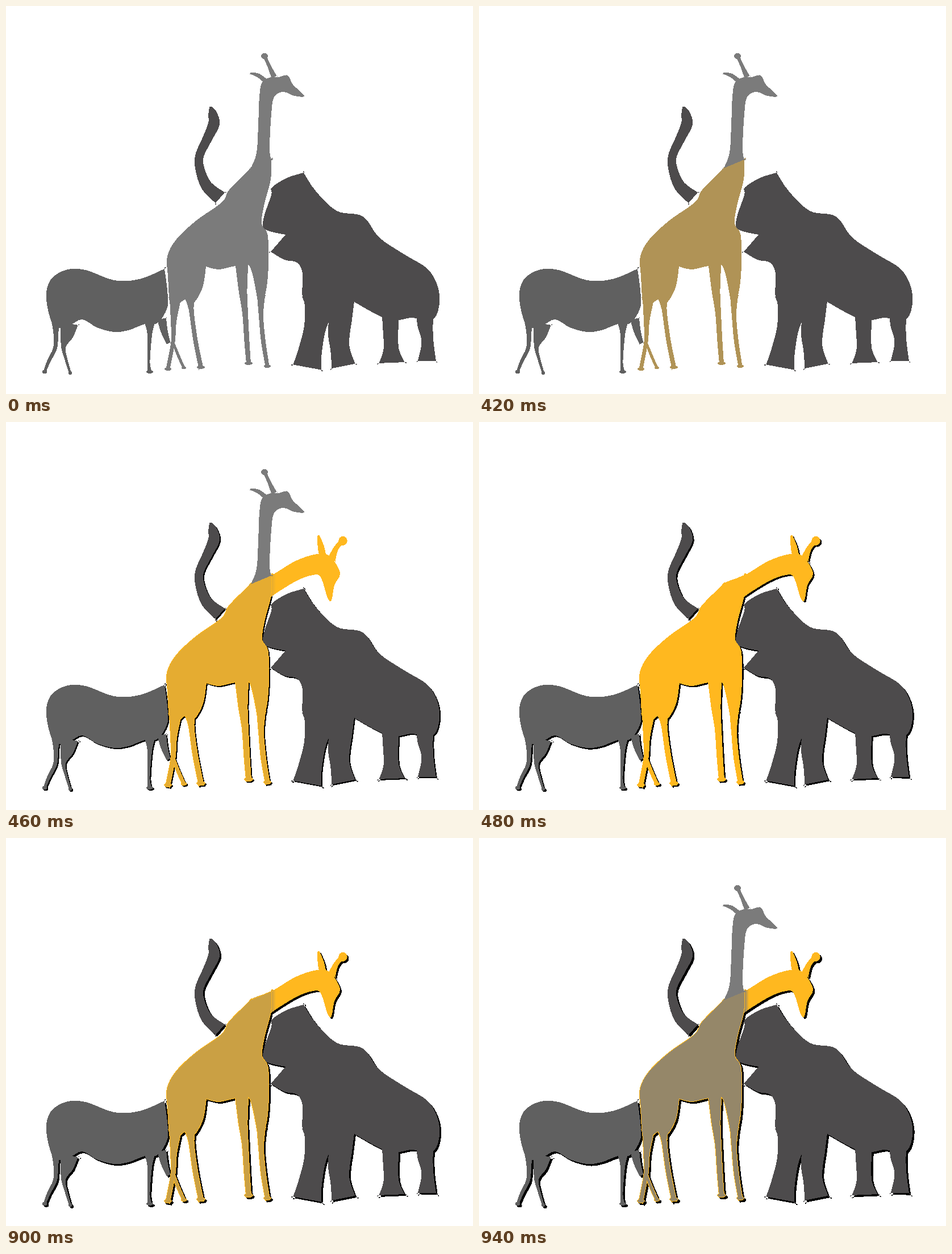
Animation, 822 px wide and 682 px high, one loop 0.96 s. Source, as an HTML page:

```html
<!DOCTYPE html>
<html lang="en">
<head>
<meta charset="utf-8">
<title>Animals</title>
<style>
  html, body { margin: 0; width: 100%; height: 100%; overflow: hidden; background: #fff; }
  svg { display: block; width: 100%; height: 100%; }
</style>
</head>
<body>
<svg viewBox="0 0 822 682" shape-rendering="crispEdges">
  <defs>
    <g id="zebra"/><g id="elephant"/><g id="body"/><g id="highNeck"/><g id="lowNeck"/>
    <linearGradient id="blend" gradientUnits="userSpaceOnUse" x1="468" y1="0" x2="475" y2="0">
      <stop id="blendFrom"/><stop offset="1" stop-color="#ffb81f"/>
    </linearGradient>
  </defs>
  <g id="shadow">
    <use href="#zebra"/><use href="#elephant"/>
    <use href="#body" stroke="#000" stroke-width="2"/>
    <use id="neckShadow" href="#lowNeck"/>
  </g>
  <use href="#zebra" fill="#606060"/>
  <use href="#elephant" fill="#4d4b4c"/>
  <g id="yellow">
    <use href="#lowNeck" fill="url(#blend)"/>
    <use href="#body" fill="#ffb81f" stroke="#ffb81f" stroke-width="2"/>
  </g>
  <use id="grey" href="#highNeck" fill="#7b7b7b"/>
  <use id="tint" href="#body"/>
</svg>
<script>
const $ = id => document.getElementById(id);
const read = text => text.trim().split(/\s+/).map(s => s.split(',').map(Number));

function add(group, tag, attrs) {
  const el = document.createElementNS('http://www.w3.org/2000/svg', tag);
  for (const k in attrs) el.setAttribute(k, attrs[k]);
  $(group).append(el);
}

// Closed smooth curve through points; a repeated point makes a corner.
function curve(group, p) {
  const n = p.length, at = i => p[(i + n) % n];
  const ctrl = (a, b, c) => [0, 1].map(k => a[k] + (c[k] - b[k]) / 6).join(' ');
  let d = 'M' + p[0].join(' ');
  for (let i = 0; i < n; i++) {
    const a = at(i), b = at(i + 1);
    d += `C${ctrl(a, at(i - 1), b)} ${ctrl(b, at(i + 2), a)} ${b.join(' ')}`;
  }
  add(group, 'path', { d: d + 'Z' });
}

const blob = (group, text) => curve(group, read(text));

// Tapered limb along "x,y,width" joints.
function limb(group, text) {
  const p = read(text), last = p.length - 1;
  const side = s => p.map(([x, y, w], i) => {
    const a = p[Math.max(0, i - 1)], b = p[Math.min(last, i + 1)];
    const dx = b[0] - a[0], dy = b[1] - a[1], k = s * w / 2 / Math.hypot(dx, dy);
    return [x - dy * k, y + dx * k];
  });
  const l = side(1), r = side(-1);
  curve(group, [l[0], ...l, l[last], r[last], ...r.reverse(), r[last]]);
  return p[last];
}

// Thin limb that ends in a hoof or a knob.
function tipped(group, text, ry) {
  const [cx, cy, w] = limb(group, text);
  add(group, 'ellipse', { cx, cy, rx: w * 0.85, ry });
}

blob('zebra', `279,462 279,462 284,500 284,530 267,557 245,559 215,570 190,573 160,565 134,551
  110,562 84,562 71,515 78,482 105,464 140,464 190,482 235,480`);
tipped('zebra', '111,558,32 107,580,22 101,600,8 106,622,5 113,645,4', 3);
tipped('zebra', '87,558,12 88,582,8 86,603,7 75,625,6 68,643,5', 3);
tipped('zebra', '253,557,18 253,575,9 252,605,5 251,628,5 253,643,7', 3);
limb('zebra', '274,550,16 279,573,12 286,593,7');

blob('body', `431,285 431,285 467,270 467,270 466,305 455,347 450,382 461,405 461,475 453,518
  444,518 429,458 404,457 375,463 352,458 352,458 346,495 330,522 316,516 306,522 290,530
  285,475 284,440 300,410 335,377 380,345 393,323`);
tipped('body', '449,510,14 449,545,8 453,590,8 460,633,7', 3);
tipped('body', '415,452,23 417,500,15 421,540,10 424,590,9 427,628,8', 3);
tipped('body', '324,512,20 326,533,9 333,585,8 343,635,8', 3);
tipped('body', '298,515,20 295,555,10 294,590,7 285,638,7', 3);
tipped('body', '295,594,5 304,616,5 313,636,5', 2);

blob('highNeck', `431,285 431,285 441,258 444,210 446,160 451,134 467,125 480,125 496,122
  505,138 525,158 508,158 488,151 472,160 467,190 464,250 467,270 467,270`);
limb('highNeck', '457,132,8 444,122,7 430,118,3');
tipped('highNeck', '472,125,10 462,103,6 455,88,7', 5);

blob('lowNeck', `428,288 470,268 510,244 548,232 570,236 588,265 578,287 573,313 566,309
  554,273 540,269 510,280 467,307 455,320`);
limb('lowNeck', '558,238,12 554,218,11 550,199,3');
tipped('lowNeck', '573,242,14 581,222,9 593,209,9', 8);

blob('elephant', `524,293 524,293 545,325 582,360 628,370 657,407 700,436 745,465 763,508
  753,550 714,548 690,552 662,547 611,519 611,519 577,521 526,521 522,470 512,451 490,446
  466,432 466,432 492,402 492,402 457,393 453,375 467,332 468,319 495,302`);
limb('elephant', '551,515,52 549,540,47 543,570,38 535,608,42 530,635,50');
limb('elephant', '596,514,35 589,550,40 586,578,38 588,603,34 594,633,42');
limb('elephant', '677,540,31 677,570,27 678,603,27 679,627,45');
limb('elephant', '738,543,31 738,562,27 742,590,21 741,624,32');
limb('elephant', `360,177,4 364,190,16 366,207,20 355,232,17 341,262,15 341,285,16
  353,316,20 377,337,25`);

const LOOP = 960, HOLD = 400, STEP = 20, HALF = 480;
const grey = [123, 123, 123], gold = [255, 184, 31];
const show = (id, on) => $(id).setAttribute('visibility', on ? 'visible' : 'hidden');

function draw(ms) {
  const t = ms % LOOP, back = t >= HALF;
  const fade = Math.max(0, Math.floor((t % HALF - HOLD) / STEP) + 1) / 5;
  const mix = back ? 1 - fade : fade;
  const tint = `rgb(${grey.map((g, i) => Math.round(g + (gold[i] - g) * mix))})`;
  const lowOn = back || fade > 0.5;
  const depth = back ? 2.5 + fade : 2;

  show('yellow', lowOn);
  show('grey', !back || fade > 0.5);
  $('shadow').setAttribute('display', lowOn ? 'inline' : 'none');
  show('neckShadow', back);
  $('shadow').setAttribute('transform', `translate(${depth} ${depth})`);
  $('tint').setAttribute('fill', tint);
  $('blendFrom').setAttribute('stop-color', tint);
}

const start = performance.now();
function tick() {
  draw(performance.now() - start);
  requestAnimationFrame(tick);
}
tick();
</script>
</body>
</html>
```
